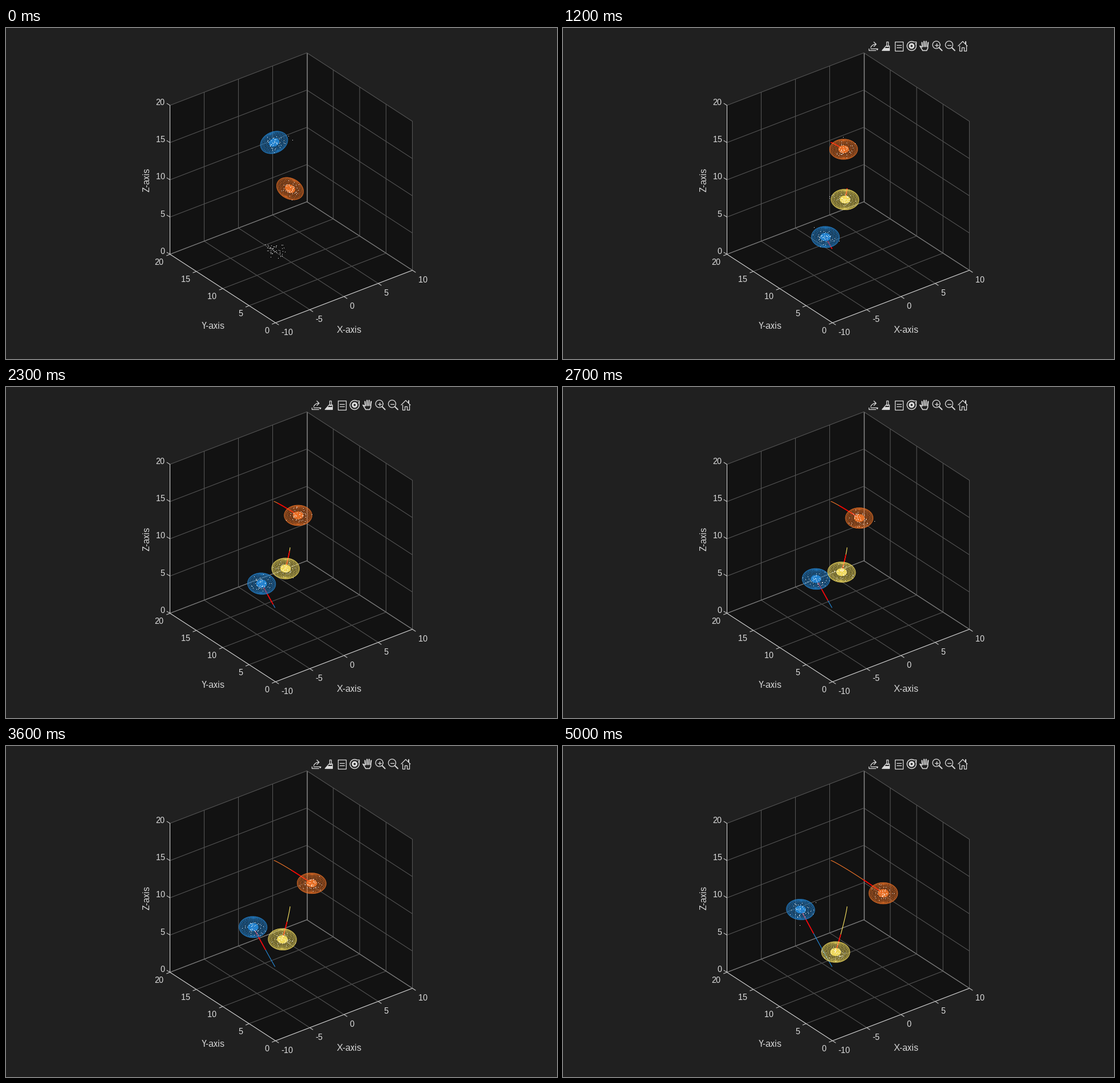
Write a matplotlib script that moves like this. It is 966 by 580 pixels and loops after 5100 ms.

```python
import numpy as np
import matplotlib.pyplot as plt
from matplotlib.animation import FuncAnimation
from matplotlib.collections import LineCollection
from matplotlib.patches import Polygon

W, H, DPI = 966, 580, 100
FRAMES, INTERVAL = 51, 100
PX = 72 / DPI  # one pixel in points

BACK, WALL = "#202020", "#121212"
GRID, SPINE, TEXT = "#545454", "#7a7a7a", "#d9d9d9"
BLUE, ORANGE, YELLOW, RED = "#268cdd", "#f57729", "#ffe864", "#ff0000"
TAIL = 20
DOTS = 46

plt.rcParams.update({"text.hinting": "default", "text.hinting_factor": 1,
                     "font.family": "Liberation Sans"})

fig = plt.figure(figsize=(W / DPI, H / DPI), dpi=DPI, facecolor=BACK)
ax = fig.add_axes([0, 0, 1, 1])
ax.set_xlim(-0.5, W - 0.5)
ax.set_ylim(H - 0.5, -0.5)
ax.axis("off")


def project(x, y, z):
    """Screen position of a point of the 3D axes."""
    return (472 + 12 * (x + 10) - 9.25 * y,
            516 - 4.6 * (x + 10) - 6 * y - 13.05 * z)


def line(points, color, width=1.0, z=2):
    xs, ys = zip(*points)
    return ax.plot(xs, ys, color=color, lw=width * PX, zorder=z,
                   solid_capstyle="round", solid_joinstyle="round")[0]


def label(x, y, text, size=15, ha="center"):
    """Text whose capitals are centred on y."""
    ax.text(x, y + 0.36 * size, text, color=TEXT, fontsize=size * PX,
            ha=ha, va="baseline", zorder=3)


def tick(point, step, offset, ha, value):
    x, y = project(*point)
    line([(x, y), (x + step[0], y + step[1])], TEXT, 1.0, 3)
    label(x + offset[0], y + offset[1], str(value), ha=ha)


def draw_axes():
    hull = [(-10, 20, 0), (-10, 20, 20), (10, 20, 20),
            (10, 0, 20), (10, 0, 0), (-10, 0, 0)]
    ax.add_patch(Polygon([project(*p) for p in hull], fc=WALL, ec="none", zorder=1))

    def edge(*points, color=GRID, width=1.1):
        line([project(*p) for p in points], color, width)

    for v in range(0, 21, 5):
        x = v - 10
        edge((x, 0, 0), (x, 20, 0), (x, 20, 20))
        edge((-10, v, 0), (10, v, 0), (10, v, 20))
        edge((-10, 20, v), (10, 20, v), (10, 0, v))
    for end in [(10, 20, 20), (-10, 20, 0), (10, 0, 0)]:
        edge((10, 20, 0), end, color=SPINE)
    edge((-10, 20, 20), (-10, 20, 0), (-10, 0, 0), (10, 0, 0), color=TEXT, width=1)

    for v in range(0, 21, 5):
        tick((-10, 20, v), (-5.5, -3.4), (-9, -6), "right", v)
        tick((-10, v, 0), (-6, 2.4), (-11, 13), "right", v)
        tick((v - 10, 0, 0), (5.5, 3.6), (10, 16), "left", v - 10)
    label(601.5, 528, "X-axis", 16.4)
    label(362.5, 521, "Y-axis", 16.4)
    ax.text(246.5, 265.5, "Z-axis", color=TEXT, fontsize=16.4 * PX, rotation=90,
            ha="center", va="center", zorder=3)


def ring(x, y, r, start=0, stop=360):
    a = np.radians(np.linspace(start, stop, 40))
    return np.column_stack([x + r * np.cos(a), y + r * np.sin(a)])


def draw_toolbar():
    """Eight outline icons in an even row; returns their artists."""
    parts = []
    share, brush, note, turn, hand, zoom_in, zoom_out, home = (
        543.5 + 22.4 * np.arange(8))

    def stroke(cx, points, width=1.3):
        parts.append(line([(cx + x, 31 + y) for x, y in points], TEXT, width, 4))

    def solid(cx, points, color=TEXT):
        shape = [(cx + x, 31 + y) for x, y in points]
        parts.append(ax.add_patch(Polygon(shape, fc=color, ec="none", zorder=4)))

    def box(x0, y0, x1, y1):
        return [(x0, y0), (x1, y0), (x1, y1), (x0, y1), (x0, y0)]

    stroke(share, [(-8, 4), (-8, 7), (4, 7)])
    stroke(share, ring(4, 6, 9, 200, 270))
    stroke(share, [(1, -7), (5, -3), (1, 1)])
    stroke(share, [(-5, 4), (7, 4)])
    solid(share, [(5, 5), (9, 5), (7, 8)])

    stroke(brush, box(1, -8, 4, 0))
    stroke(brush, [(0, 0), (6, 0), (6, 8), (-7, 8), (0, 0)])
    solid(brush, [(-3, 3), (6, 3), (6, 8), (-7, 8)])

    stroke(note, box(-7, -8, 7, 8))
    for y in (-2, 2):
        stroke(note, [(-4, y), (4, y)])

    stroke(turn, ring(0, 0, 8, -35, 300), 1.5)
    stroke(turn, [(3, -8), (8, -8), (8, -4)])
    solid(turn, ring(0, 0, 5))
    solid(turn, ring(0, 0, 1.8), BACK)

    for k, top in enumerate((-6, -8, -8, -6)):
        x = 3 * k - 3.5
        stroke(hand, [(x, 1), (1.2 * x, top)], 2.2)
    stroke(hand, [(-3, 8), (-8, 0), (-4, 2)], 1.6)
    stroke(hand, [(6, 0), (6, 4), (4, 8), (-3, 8)], 1.6)

    for cx in (zoom_in, zoom_out):
        stroke(cx, ring(-1.5, -2, 6.5))
        stroke(cx, [(3.5, 3), (8.5, 8)], 2)
        stroke(cx, [(-4.5, -2), (1.5, -2)])
    stroke(zoom_in, [(-1.5, -5), (-1.5, 1)])

    stroke(home, [(-8, 0), (0, -8), (8, 0)])
    stroke(home, [(5, -4), (5, -8)], 2)
    stroke(home, [(-6, -1), (-6, 8), (-2, 8), (-2, 2), (2, 2), (2, 8),
                  (6, 8), (6, -1)])
    return parts


def sphere_mesh(n=20, elevation=30):
    """Unit sphere wires seen from above, as curves inside the unit disc."""
    e = np.radians(elevation)

    def view(u, v):
        x = np.cos(v) * np.cos(u)
        y = np.cos(v) * np.sin(u) * np.sin(e) - np.sin(v) * np.cos(e)
        return np.column_stack([x, y])

    around = np.linspace(0, 2 * np.pi, 37)
    rise = np.linspace(-np.pi / 2, np.pi / 2, n + 1)
    meridians = [view(u, rise) for u in np.arange(n) * 2 * np.pi / n]
    parallels = [view(around, np.full_like(around, v)) for v in rise[1:-1]]
    return meridians + parallels


MESH = sphere_mesh()
DISC = ring(0, 0, 1)


class Cloud:
    """Particle cloud with its spread ellipsoids and trail."""

    def __init__(self, start, end, power, tilt, first_color, color, seed):
        self.start, self.end, self.power = map(np.array, (start, end, power))
        self.tilt, self.seed = tilt, seed
        self.first_color, self.color = first_color, color
        z = 5 + seed * 0.1
        self.trail = line([(0, 0)], color, 1.1, z)
        self.tail = line([(0, 0)], RED, 1.7, z + 0.01)
        self.shell = ax.add_patch(Polygon(DISC, lw=0.8 * PX, zorder=z + 0.02))
        self.mesh = LineCollection([], linewidths=0.7 * PX, alpha=0.3,
                                   zorder=z + 0.03)
        ax.add_collection(self.mesh)
        self.core = ax.add_patch(Polygon(DISC, alpha=0.88, lw=0, zorder=z + 0.04))
        self.dots = ax.plot([], [], "s", ms=PX, mew=0, color="white",
                            zorder=z + 0.05)[0]

    def position(self, i):
        """Nearly straight drift that bends a little at the start."""
        u = np.reshape(i, (-1, 1)) / (FRAMES - 1)
        return self.start + (self.end - self.start) * u ** self.power

    def update(self, i):
        rng = np.random.default_rng(1000 * self.seed + i)
        path = self.position(np.arange(i + 1))
        size = np.array([25, 18.3]) + rng.uniform(-0.6, 0.6, 2)
        angle = np.radians(2 + self.tilt * np.exp(-i / 5) + rng.uniform(-2, 2))
        c, s = np.cos(angle), np.sin(angle)
        turn = np.array([[c, s], [-s, c]])

        def place(points, scale=1.0):
            return (points * size * scale) @ turn + path[-1]

        self.trail.set_data(*path.T)
        self.tail.set_data(*path[-TAIL:].T)

        color = self.color if i else self.first_color
        for part in (self.shell, self.mesh, self.core):
            part.set_visible(color is not None)
        if color:
            self.shell.set_xy(place(DISC))
            self.shell.set_facecolor((color, 0.3))
            self.shell.set_edgecolor((color, 0.4))
            self.mesh.set_segments([place(curve) for curve in MESH])
            self.mesh.set_color(color)
            self.core.set_xy(place(DISC, 0.38))
            self.core.set_facecolor(color)

        spots = np.round(place(rng.normal(0, 0.36, (DOTS, 2))))
        self.dots.set_data(*spots.T)


draw_axes()
toolbar = draw_toolbar()
clouds = [
    Cloud((471, 386), (416, 286), (1.1, 1.12), 10, None, BLUE, 1),
    Cloud((469.5, 200), (561, 257.5), (1.0, 1.1), -24, BLUE, ORANGE, 2),
    Cloud((497.5, 281), (477.5, 360.5), (1.2, 1.0), 25, ORANGE, YELLOW, 3),
]


def update(i):
    for part in toolbar:
        part.set_visible(i > 0)
    for cloud in clouds:
        cloud.update(i)
    return []


anim = FuncAnimation(fig, update, frames=FRAMES, interval=INTERVAL,
                     init_func=lambda: update(0), repeat=True, repeat_delay=0)
plt.show()
```
